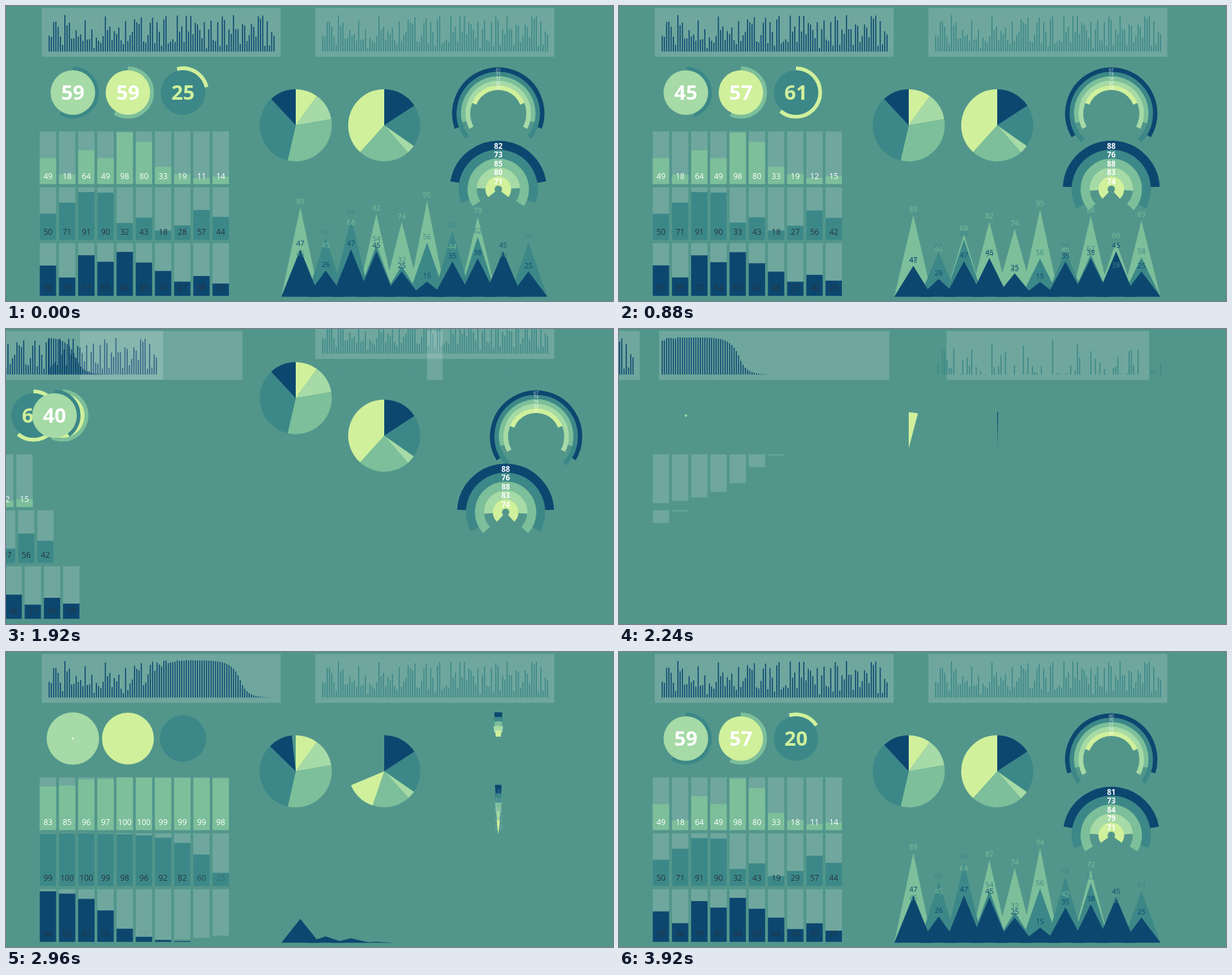
An HTML page with a canvas for the animation above (3960 ms loop, 926 px wide and 450 px high).

```html
<!DOCTYPE html>
<html lang="en">
<head>
<meta charset="utf-8">
<title>Chart board</title>
<style>
html, body { margin: 0; width: 100%; height: 100%; overflow: hidden; background: #52968b; }
canvas { display: block; width: 926px; height: 450px; }
</style>
</head>
<body>
<canvas id="stage"></canvas>
<script>
const LOOP = 3960, W = 926, H = 450;
const NAVY = '#0c4770', TEAL = '#3c8888', GREEN = '#7cbf9a', MINT = '#a6daa6', LIME = '#d0f09c';
const BACK = '#52968b', PANEL = 'rgba(255,255,255,.165)', INK = '#26353f';
const SHADES = [NAVY, TEAL, GREEN, MINT, LIME];
const DEG = Math.PI / 180;

const canvas = document.getElementById('stage');
const ctx = canvas.getContext('2d');
const dpr = window.devicePixelRatio || 1;
canvas.width = W * dpr;
canvas.height = H * dpr;

const clamp = v => Math.max(0, Math.min(1, v));
const part = (t, start, dur) => clamp((t - start) / dur);
const mix = (a, b, p) => a + (b - a) * p;
const quadOut = p => 1 - (1 - p) ** 2;
const cubicOut = p => 1 - (1 - p) ** 3;
const cubicInOut = p => p < .5 ? 4 * p ** 3 : 1 - 4 * (1 - p) ** 3;
const random = i => { const s = Math.sin(i * 12.9898 + 4.1) * 43758.5453; return s - Math.floor(s); };

// Steep rise centred on mid, one unit per 40 ms
function rise(t, mid) {
  const x = (t - mid) / 40;
  return x < 0 ? .5 * 2.6 ** x : 1 - .5 * 2.2 ** -x;
}

// Rise to full height, then spring down to v
function level(t, mid, v) {
  const y = (t - mid - 558) / 40;
  const drop = y < 0 ? .5 * 1.8 ** y
    : y < 1.5 ? .5 + y / 3
    : 1 + .26 * .817 ** y * Math.sin(.54 * (y - 1.5));
  return Math.max(0, rise(t, mid) + (v - 1) * drop);
}

function rect(x, y, w, h, fill) {
  ctx.fillStyle = fill;
  ctx.fillRect(x, y, w, h);
}

function text(str, x, y, size, fill, weight = 400, alpha = 1) {
  ctx.globalAlpha = alpha;
  ctx.font = `${weight} ${size}px "Open Sans", sans-serif`;
  ctx.fillStyle = fill;
  ctx.fillText(str, x, y + size * .36);
  ctx.globalAlpha = 1;
}

// Angles in degrees, clockwise from the top
function wedge(x, y, r, from, to, fill) {
  ctx.fillStyle = fill;
  ctx.beginPath();
  ctx.moveTo(x, y);
  ctx.arc(x, y, r, (from - 90) * DEG, (to - 90) * DEG);
  ctx.fill();
}

function arc(x, y, r, width, from, to, stroke) {
  if (to - from < .1) return;
  ctx.strokeStyle = stroke;
  ctx.lineWidth = width;
  ctx.beginPath();
  ctx.arc(x, y, r, (from - 90) * DEG, (to - 90) * DEG);
  ctx.stroke();
}

// Signal strips
const signal = i => mix(.08, .98, random(i));

function strip(t, x, start, dur, fill, height) {
  const w = 364.5 * cubicOut(part(t, start, dur));
  rect(x + 182.5 - w / 2, 3, w, 74.5, PANEL);
  for (let i = 0; i < 101; i++) {
    const h = 57 * height(i);
    if (h > .2) rect(x + 10.7 + i * 3.43, 69.5 - h, 1.6, h, fill);
  }
}

const leftStrip = t => strip(t, 54.3, 1637, 900, NAVY, i => level(t, 1757 + 14.2 * i, signal(i)));
const rightStrip = t => strip(t, 471.7, 1905, 720, TEAL,
  i => signal(i) * rise(t, 2000 + 800 * random(i + 500)));

// Counters: disc, ring and label colours, and the running value
const counters = [
  [MINT, TEAL, '#fff', t => 61.6 * quadOut(part(t, 3000, 800)) - 21.6 * quadOut(part(t, 3825, 1900))],
  [LIME, GREEN, '#fff', t => 66 * quadOut(part(t, 3352, 900)) - 9 * cubicInOut(part(t, 4252, 560))],
  [TEAL, LIME, LIME, t => 61 * quadOut(part(t, 3780, 770))]];

function counter(t, i) {
  const x = 102 + 84 * i, y = 132;
  const [fill, ring, ink, value] = counters[i];
  const grow = cubicOut(part(t, 2230 + 185 * i, 700));
  if (!grow) return;
  const shrink = cubicInOut(part(t, 3000 + 170 * i, 500));
  const v = value(t);
  const turn = i === 2 ? -24 * (1 - v / 61) : 0;
  arc(x, y, 36.8, 6, turn, turn + v * 3.6, ring);
  wedge(x, y, 40 * grow - 6 * shrink, 0, 360, fill);
  const size = 31 * cubicOut(part(t, 2935 + 90 * i, 500));
  if (size > 1) text(Math.round(v), x, y, size, ink, 700);
}

// Column rows
const rows = [
  [GREEN, '#fff', [49, 18, 64, 49, 98, 80, 33, 19, 12, 15]],
  [TEAL, INK, [50, 71, 91, 90, 33, 43, 18, 27, 56, 42]],
  [NAVY, INK, [58, 35, 77, 64, 83, 62, 46, 27, 40, 29]]];

function panelGrow(t, k) {
  const a = (t - 1992) / 40 - k;
  return a <= 0 ? 0 : a < 2 ? .5 * (a / 2) ** 1.5 : 1 - .5 * .64 ** (a - 2);
}

function columns(t, r) {
  const [fill, ink, values] = rows[r];
  const y = 191.3 + 85.3 * r, full = 80.3;
  values.forEach((value, i) => {
    const x = 51.5 + 29.28 * i, k = i + 5 * r, mid = 2430 + 40 * k;
    rect(x, y, 25, full * panelGrow(t, k), PANEL);
    const shown = level(t, mid, value / 100);
    if (shown < .01) return;
    rect(x, y + full * (1 - shown), 25, full * shown, fill);
    text(Math.round(shown * 100), x + 12.5, y + 68, 12, ink, 400, clamp(rise(t, mid) * 1.2));
  });
}

function pie(t, x, start, gap, shades, stops) {
  let from = 0;
  shades.forEach((fill, i) => {
    const size = stops[i + 1] - stops[i];
    const to = from + size * cubicOut(part(t, start + gap * i, 700));
    if (to > from) wedge(x, 182, 55, from, to, fill);
    from = to;
  });
}

const pieA = t => pie(t, 442, 2130, 108, [LIME, MINT, GREEN, TEAL, NAVY], [0, 36, 80, 193, 317, 360]);
const pieB = t => pie(t, 577, 2235, 158, [NAVY, TEAL, MINT, GREEN, LIME], [0, 57, 125, 139, 222, 360]);

// Nested arcs opening from the top; sweeps are half angles
function gauge(t, y, radius, step, sweeps, progress, label) {
  sweeps.forEach((sweep, i) => {
    const p = progress(i), r = radius - step * i;
    arc(751, y, r, (step + .4) * (1 + .6 * (1 - p) ** 8), -sweep * p, sweep * p, SHADES[i]);
  });
  sweeps.forEach((sweep, i) => {
    const p = progress(i);
    if (p) label(i, p, y - radius + step * i, sweep);
  });
}

const thinGauge = t => gauge(t, 164, 66.8, 6.8, [121, 134, 105, 118, 68],
  i => cubicOut(part(t, 2935, 1900 - 270 * i)),
  (i, p, y, sweep) => text(Math.round(sweep * p / 1.8), 751, y, 6.5, '#fff', 400, .8 * clamp(p * 2)));

const wideValues = [88, 76, 88, 83, 74];
const wideGauge = t => gauge(t, 279.5, 67, 13.6, [87, 119, 133, 94, 138],
  () => cubicOut(part(t, 2935, 1760)),
  (i, p, y) => text(Math.round(wideValues[i] * (1 - (1 - p) * (i ? .5 : 1))), 751, y + 1, 11.5, '#fff', 700, clamp(p * 3)));

// Peaks rise above their resting height, then settle in a wave from the left
const peakLayers = [
  { fill: GREEN, scale: 1.4, over: 1.1, up: 3080, down: 3900, dur: 350,
    values: [89, 45, 68, 82, 74, 95, 45, 88, 60, 83] },
  { fill: TEAL, scale: 1.04, over: 1.42, up: 2895, down: 3655, dur: 600,
    values: [45, 66, 84, 54, 32, 56, 68, 62, 38, 58] },
  { fill: NAVY, scale: .98, over: 1.57, up: 2660, down: 4365, dur: 600,
    values: [47, 26, 47, 45, 25, 15, 35, 38, 45, 25] }];

function peaks(t) {
  const labels = [];
  for (const { fill, scale, over, up, down, dur, values } of peakLayers) {
    ctx.fillStyle = fill;
    values.forEach((v, i) => {
      const p = cubicInOut(part(t, up + 65 * i, 600));
      if (p < .001) return;
      const x = 449 + 38.67 * i;
      const top = 443.5 - v * scale * p * mix(over, 1, cubicInOut(part(t, down + 65 * i, dur)));
      ctx.beginPath();
      ctx.moveTo(x - 29, 443.5);
      ctx.lineTo(x, top);
      ctx.lineTo(x + 29, 443.5);
      ctx.fill();
      if (p > .55) labels.push([Math.round(v * p), x, top - 9, 11, fill, 400, clamp((p - .55) * 4)]);
    });
  }
  labels.forEach(label => text(...label));
}

// Each part: painter, leaving direction, leaving time
const parts = [
  [rightStrip, 0, -1, 1808],
  [t => counter(t, 2), -1, 0, 1619],
  [t => counter(t, 1), -1, 0, 1721],
  [t => counter(t, 0), -1, 0, 1815],
  [t => columns(t, 0), -1, 0, 1575],
  [t => columns(t, 1), -1, 0, 1594],
  [t => columns(t, 2), -1, 0, 1619],
  [pieA, 0, -1, 1746],
  [pieB, 0, -1, 1833],
  [thinGauge, 1, 0, 1769],
  [wideGauge, 1, 0, 1854],
  [peaks, 0, 1, 1560]];

function show(paint, t, dx, dy) {
  ctx.save();
  ctx.translate(dx, dy);
  paint(t + LOOP);
  ctx.restore();
  if (t >= 1637) paint(t);
}

function draw(t) {
  ctx.setTransform(dpr, 0, 0, dpr, 0, 0);
  rect(0, 0, W, H, BACK);
  ctx.textAlign = 'center';
  show(leftStrip, t, -.65 * Math.max(0, t - 1645), 0);
  for (const [paint, dx, dy, leave] of parts) {
    const d = .0025 * Math.max(0, t - leave) ** 2;
    show(paint, t, dx * d, dy * d);
  }
}

const begin = performance.now();
function tick() {
  draw((performance.now() - begin) % LOOP);
  requestAnimationFrame(tick);
}
tick();
</script>
</body>
</html>
```
